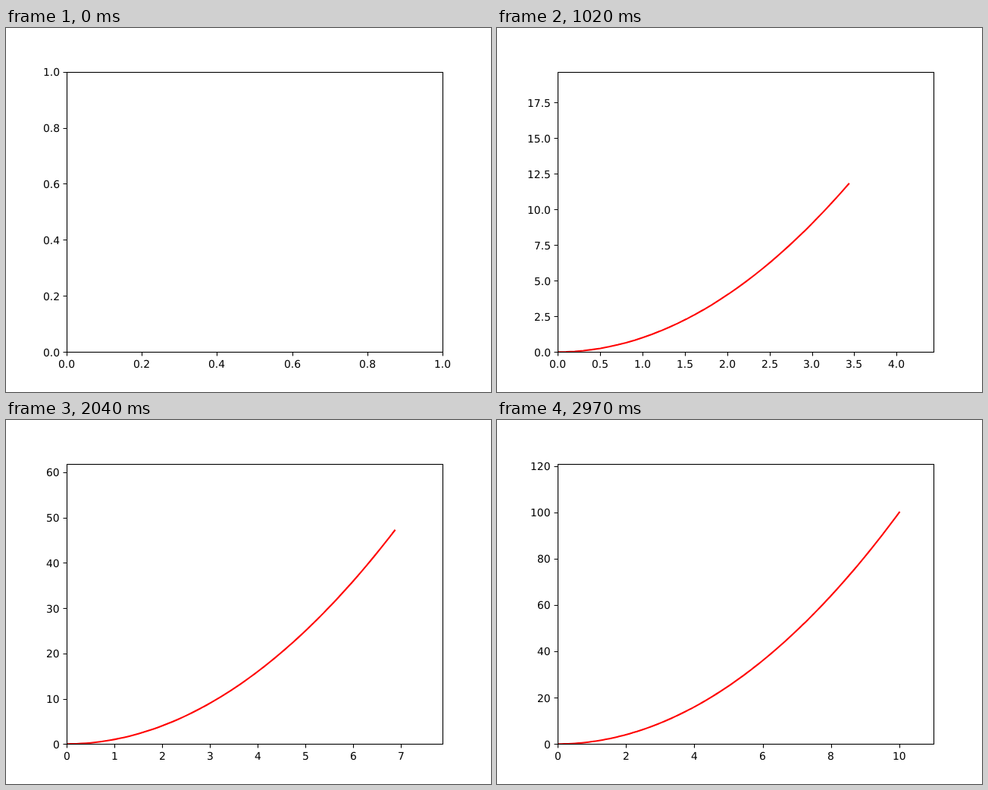
Animation of 640 by 480 pixels, one loop 3000 ms. Source, as an HTML page:

```html
<!DOCTYPE html>
<html lang="en">
<head>
<meta charset="utf-8">
<title>Growing parabola</title>
<style>
  html, body { margin: 0; width: 100%; height: 100%; overflow: hidden; background: #fff; }
  svg { display: block; width: 640px; height: 480px; }
  text { font: 13.889px "DejaVu Sans", sans-serif; text-rendering: geometricPrecision; }
</style>
</head>
<body>
<svg viewBox="0 0 640 480">
  <clipPath id="plot"><rect x="80" y="58" width="496" height="370"/></clipPath>
  <path id="curve" clip-path="url(#plot)" fill="none" stroke="#f00" stroke-width="2.083"
        stroke-linecap="square" stroke-linejoin="round"/>
  <path id="ticks" fill="none" stroke="#000" stroke-width="1.111"/>
  <rect x="80.5" y="58.5" width="496" height="369" fill="none" stroke="#000" stroke-width="1.111"/>
  <g id="labels"></g>
</svg>
<script>
const STEP_MS = 30, COUNT = 100, X_MAX = 10;
const LEFT = 80, BOTTOM = 427.2, WIDTH = 496, HEIGHT = 369.6;
const DIGIT = 8.836, DOT = 4.414, BEARING = 0.92;
const [curve, ticks, labels] = ['curve', 'ticks', 'labels'].map(id => document.getElementById(id));

const sampleX = i => X_MAX * i / (COUNT - 1);

// Smallest round step that leaves at most nine intervals
function tickStep(limit) {
  const raw = limit / 9 - 1e-9;
  const power = 10 ** Math.floor(Math.log10(raw));
  return [1, 2, 2.5, 5, 10].find(s => s * power >= raw) * power;
}

function axisTicks(limit) {
  const step = tickStep(limit);
  const decimals = [0, 1, 2].find(d => Math.abs(step - step.toFixed(d)) < 1e-6);
  const count = Math.floor(limit / step + 1e-9) + 1;
  return Array.from({ length: count }, (_, k) => ({
    part: k * step / limit,
    text: (k * step).toFixed(decimals)
  }));
}

function inkWidth(text) {
  return [...text].reduce((sum, c) => sum + (c === '.' ? DOT : DIGIT), -BEARING);
}

const label = (x, y, text) => `<text x="${Math.floor(x)}" y="${y}">${text}</text>`;

function draw(index) {
  const xLimit = sampleX(index) + 1, yLimit = xLimit ** 2;
  const toX = part => LEFT + part * WIDTH;
  const toY = part => BOTTOM - part * HEIGHT;
  let marks = '', texts = '';

  for (const { part, text } of axisTicks(xLimit)) {
    const x = toX(part);
    marks += `M${Math.floor(x + 0.5) + 0.5} 427.5v5`;
    texts += label(x - inkWidth(text) / 2, 448, text);
  }
  for (const { part, text } of axisTicks(yLimit)) {
    const y = toY(part);
    marks += `M80.5 ${Math.floor(y + 0.5) + 0.5}h-5`;
    texts += label(70.28 - inkWidth(text), Math.floor(y + 5.95), text);
  }

  const points = Array.from({ length: index + 1 }, (_, i) => {
    const x = sampleX(i);
    return `${toX(x / xLimit).toFixed(3)} ${toY(x * x / yLimit).toFixed(3)}`;
  });
  curve.setAttribute('d', index ? 'M' + points.join('L') : '');
  ticks.setAttribute('d', marks);
  labels.innerHTML = texts;
}

const start = performance.now();
let shown = -1;
function tick() {
  const index = Math.floor((performance.now() - start) / STEP_MS) % COUNT;
  if (index !== shown) draw(shown = index);
  requestAnimationFrame(tick);
}
tick();
</script>
</body>
</html>
```
